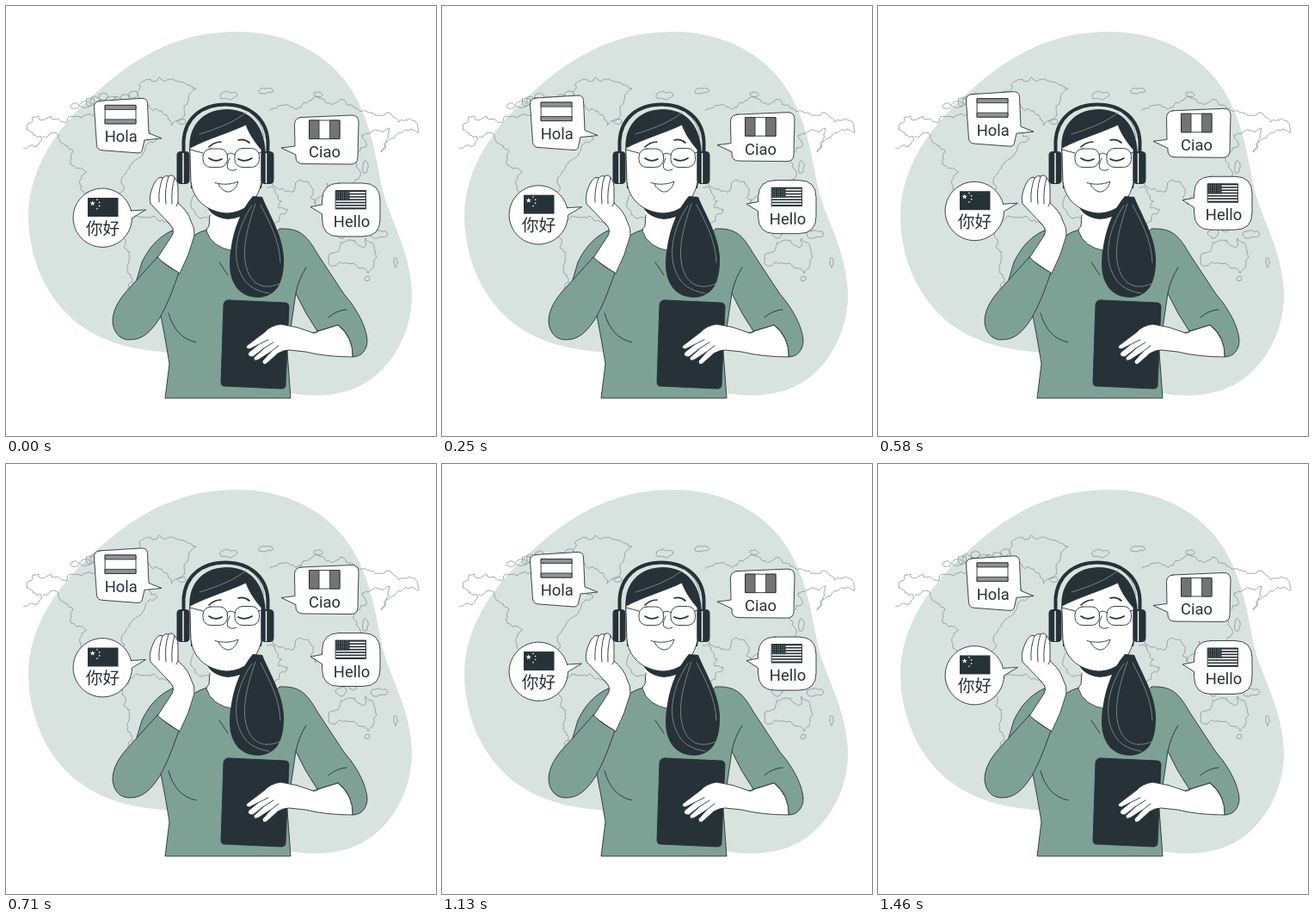
Animation, 500 px wide and 500 px high, one loop 1500 ms. Source, as an HTML page:

```html
<!DOCTYPE html>
<html lang="en">
<head>
<meta charset="utf-8">
<title>Languages</title>
<style>
  html, body { margin: 0; width: 100%; height: 100%; overflow: hidden; background: #fff; }
  svg { display: block; width: 100vw; height: 100vh; }
  .ink { stroke: #263238; stroke-width: .9; stroke-linejoin: round; stroke-linecap: round; }
  .line { fill: none; }
  .skin { fill: #fff; }
  .knit { fill: #7ea196; }
  .dark { fill: #263238; }
  .shine { fill: none; stroke: #8d9699; stroke-width: .8; stroke-linecap: round; }
  #map { fill: none; stroke: #8c9495; stroke-width: .8; stroke-linejoin: round; }
  text { font: 18.4px Roboto, "Open Sans", sans-serif; fill: #263238; text-anchor: middle; }
  .cjk { font: 19.7px "Noto Sans CJK SC", "Noto Sans CJK", sans-serif; }
</style>
</head>
<body>
<svg viewBox="0 0 500 500">
  <path fill="#d8e2df" d="M265 30C323 28 376 55 402 98C425 136 430 176 437 210C444 245 470 281 472 334C473 380 446 430 402 446C356 461 312 449 280 432C246 413 220 406 180 402C132 398 94 383 68 355C40 325 26 284 26 243C27 187 61 141 99 106C146 62 195 31 265 30Z"/>
  <g id="map"></g>

  <!-- hair, body and head -->
  <path class="dark" d="M214 172C210 142 226 121 256 120C286 120 302 141 302 176L297 212H215Z"/>
  <path class="knit ink" d="M234 260Q226 262 218 267L196 260C180 266 167 279 158 298L150 325L180 360Q186 390 190 416L185 456H331L327 402L337 334Q348 358 362 378L386 371C397 378 403 391 403 408C414 408 420 399 420 389C419 373 408 352 393 335L362 288C350 267 342 258 318 259L290 290Z"/>
  <path class="skin" d="M236 230V256L233 261Q238 280 264 285L296 290V222Z"/>
  <path class="line ink" d="M237 243L236 256Q233 259 233 261Q238 280 264 285"/>
  <path class="dark" d="M232 229Q237 246 258 248Q273 247 283 239L290 222Z"/>
  <path class="skin ink" d="M214 165C235 154 263 146 279 138C283 149 290 159 297 167V205C293 227 276 241 256 241C233 239 217 225 215 204Z"/>
  <path class="dark" d="M287 221C271 240 261 268 260 300C260 325 274 339 293 339C314 338 324 323 323 291C321 265 306 242 298 222Z"/>
  <path class="shine" d="M286 232C268 258 263 290 272 309C278 324 288 331 306 334M290 230C279 262 272 291 283 313C291 327 304 329 318 323M296 231C307 253 318 272 319 298"/>
  <path class="shine" d="M225 149C248 142 267 134 279 124M284 124C294 132 299 143 300 153"/>

  <!-- face -->
  <g class="line ink">
    <rect x="229" y="166" width="28.500" height="21.500" rx="9"/>
    <rect x="266" y="165.500" width="28.500" height="22" rx="9"/>
    <path d="M257 173Q261 169 266 173M229 171L214 167M294 171L298 170"/>
    <path d="M260 177Q256 185 258 189Q262 193 268 190"/>
    <path stroke-width="1.700" d="M236 177Q243 182 251 178M270 178Q278 182 286 177M236 164Q242 158 250 158M270 156Q277 154 283 159"/>
  </g>
  <path class="skin ink" d="M243 205.500C250 208 262 208 270 204C268 212 262 217 257 216Q250 214 247 207"/>

  <!-- headphones -->
  <path fill="none" stroke="#263238" stroke-width="4" d="M206.500 174V157C208 131 227 114.500 255 114.500C284 114.500 303 132 304.500 157V174"/>
  <rect class="dark" x="198.500" y="169" width="15" height="38" rx="4.500"/>
  <rect class="dark" x="296.500" y="169" width="15" height="38" rx="4.500"/>
  <path stroke="#fff" stroke-width="1.400" d="M206 171V206M302.500 171V206"/>

  <!-- folds -->
  <path class="line ink" d="M189 357Q197 386 221 391M248 298L258 313M349 304Q340 318 337 334M375 362Q384 354 396 353"/>

  <!-- raised arm -->
  <path class="skin ink" d="M176 293L193 267Q197 260 190 253L168 230C166 221 169 213 173 205Q178 197 182 200Q186 196 189 198Q194 195 196 200Q200 203 200 210V229Q212 239 215 250Q220 258 219 267Q213 290 202 311Z"/>
  <path class="line ink" d="M182 200Q177 213 178 228M189 198Q184 213 186 230M196 200Q192 213 193 230M200 229L198 233"/>
  <path class="knit ink" d="M176 292L139 333C128 346 124 357 124 367C125 381 134 389 145 388C159 388 169 378 178 364C188 347 195 327 201 310Q187 303 176 292Z"/>

  <!-- tablet and hand -->
  <path class="dark ink" d="M259 342L324 345Q329 345 329 350L325 441Q325 445 320 445L254 442Q250 442 250 437L253 347Q254 342 259 342Z"/>
  <path class="skin ink" d="M386 371L357 380Q338 372 319 370Q307 372 301 379L280 395Q278 398 283 399L293 394L282 403Q280 408 287 408L300 398L288 409Q288 414 294 411L308 402L298 413Q299 419 304 415L316 404Q323 400 329 400L348 402Q372 408 403 408Q404 386 386 371Z"/>
  <path class="line ink" d="M293 394L305 388M300 398L311 391M308 402L317 395M357 380Q361 381 363 378"/>

  <!-- speech bubbles -->
  <g id="talk">
    <g transform="translate(0 .9)">
      <path class="skin ink" d="M109 109.500L157 106.500Q164 106 164.500 112L166 147L181 153L161 155L158.500 166Q158 170 153 170L113 167Q106 167 105.500 161L102.500 117Q102 110 109 109.500Z"/>
      <rect class="skin ink" x="115.500" y="114.500" width="35.500" height="21.500"/>
      <path class="ink" fill="#929292" d="M115.500 114.500H151V119.500H115.500ZM115.500 131H151V136H115.500Z"/>
      <text x="133.700" y="157.500">Hola</text>
    </g>

    <path class="skin ink" d="M343 129.500L402 127Q410 127 410 135L409 176Q409 184 401 184L345 183.500Q337 183 337 176V173L320 165L336 163L335.500 138Q335.500 130 343 129.500Z"/>
    <rect class="skin ink" x="353" y="133" width="35" height="21.500"/>
    <path class="ink" fill="#747474" d="M353 133H364V154.500H353ZM377 133H388V154.500H377Z"/>
    <text x="370.500" y="176">Ciao</text>

    <path class="skin ink" d="M145.500 238L162.500 237L146.500 246.500A34.200 34.200 0 1 1 145.500 238Z"/>
    <rect class="dark" x="95" y="223" width="35.500" height="22"/>
    <g id="stars" fill="#fff"></g>
    <text class="cjk" x="112.500" y="265.800">你好</text>

    <path class="skin ink" d="M387 206H415Q435 206 435 226V248Q435 268 415 268H387Q368 268 367.500 248V242L354 233.500L367.500 231V226Q368 206 387 206Z"/>
    <rect class="skin ink" x="383.500" y="214.500" width="35" height="21.500"/>
    <g id="stripes"></g>
    <text x="402" y="257">Hello</text>
  </g>
</svg>
<script>
const $ = id => document.getElementById(id);

let seed = 11;
const rand = () => (seed = (seed * 16807) % 2147483647) / 2147483647 - .5;

// Roughens a few key points into a coastline by midpoint displacement.
function coast(n) {
  let d = 'M' + n[0];
  const cut = (a, b) => {
    const dx = b[0] - a[0], dy = b[1] - a[1];
    if (Math.hypot(dx, dy) < 4) { d += 'L' + b.map(v => v.toFixed(1)); return; }
    const k = rand() * .55;
    const m = [(a[0] + b[0]) / 2 - dy * k, (a[1] + b[1]) / 2 + dx * k];
    cut(a, m);
    cut(m, b);
  };
  for (let i = 1; i < n.length; i++) cut(n[i - 1], n[i]);
  return `<path d="${d}"/>`;
}

const shore = s => coast(s.split(' ').map(p => p.split(',').map(Number)));

function isle(x, y, rx, ry) {
  const ring = [...Array(8).keys()].map(i => {
    const a = i * Math.PI / 4, q = 1 + rand() * .4;
    return [x + rx * q * Math.cos(a), y + ry * q * Math.sin(a)];
  });
  return coast([...ring, ring[0]]);
}

const shores = [
  // the Americas
  '20,165 41,152 24,144 31,129 52,128 88,130 126,128 146,148 155,133 176,155 159,171 134,205 137,214 112,220',
  '43,152 61,150 76,178 90,216 120,241 143,253 137,280 144,295 141,329',
  '143,253 163,246 196,261 183,283',
  '154,98 207,89 221,96 207,120 192,139 181,122 154,98',
  // Africa and Asia
  '221,216 215,229 228,247 238,249',
  '303,211 317,235 327,236 312,254',
  '304,184 325,216 342,202 360,231 373,206 391,231 398,207 412,193 404,180 418,164 414,150 446,142',
  '446,142 436,170 449,154 471,143 480,147 474,133 442,124 418,122 384,112 364,107 343,118 306,122',
  // Australia
  '375,300 379,287 405,272 415,281 418,270 431,291 421,311 397,299 375,300'
];

const isles = [
  [204, 134, 5, 3], [258, 104, 10, 5], [302, 99, 9, 3], [363, 103, 5, 3], [418, 187, 3, 9],
  [433, 265, 11, 4], [420, 317, 3, 3], [453, 298, 2, 6], [390, 265, 6, 5], [404, 257, 5, 6]
];
// Arctic archipelago
for (let i = 0; i < 9; i++)
  isles.push([82 + i * 8 + rand() * 5, 117 - i * 1.8 + rand() * 10, 6 + rand() * 3, 4 + rand() * 2]);

$('map').innerHTML = shores.map(shore).join('') + isles.map(i => isle(...i)).join('');

function star(x, y, r) {
  const p = [...Array(10).keys()].map(i => {
    const a = i * Math.PI / 5, q = i % 2 ? r * .4 : r;
    return [(x + q * Math.sin(a)).toFixed(2), (y - q * Math.cos(a)).toFixed(2)];
  });
  return `<polygon points="${p.join(' ')}"/>`;
}
let stars = star(100.7, 229.5, 3.3);
for (let i = 0; i < 4; i++) {
  const a = (i - 1.5) * .62;
  stars += star(101.500 + 7.5 * Math.cos(a), 230.5 + 6.5 * Math.sin(a), 1.3);
}
$('stars').innerHTML = stars;

let flag = '';
for (let i = 0; i < 13; i += 2)
  flag += `<rect class="dark" x="383.5" y="${214.5 + i * 1.654}" width="35" height="1.654"/>`;
flag += '<rect class="dark" x="383.5" y="214.5" width="16" height="11.6"/>';
for (let r = 0; r < 5; r++)
  for (let c = 0; c < 6; c++)
    flag += `<circle cx="${385.2 + c * 2.5}" cy="${216.2 + r * 2.1}" r=".45" fill="#fff"/>`;
$('stripes').innerHTML = flag;

const loop = 1500, rise = 10;
function draw(now) {
  const p = (now % loop) / loop;
  const y = -rise * (1 - Math.abs(1 - 2 * p));
  $('talk').setAttribute('transform', `translate(0 ${y.toFixed(3)})`);
}

const start = performance.now();
function tick() {
  draw(performance.now() - start);
  requestAnimationFrame(tick);
}
draw(0);
requestAnimationFrame(tick);
</script>
</body>
</html>
```
